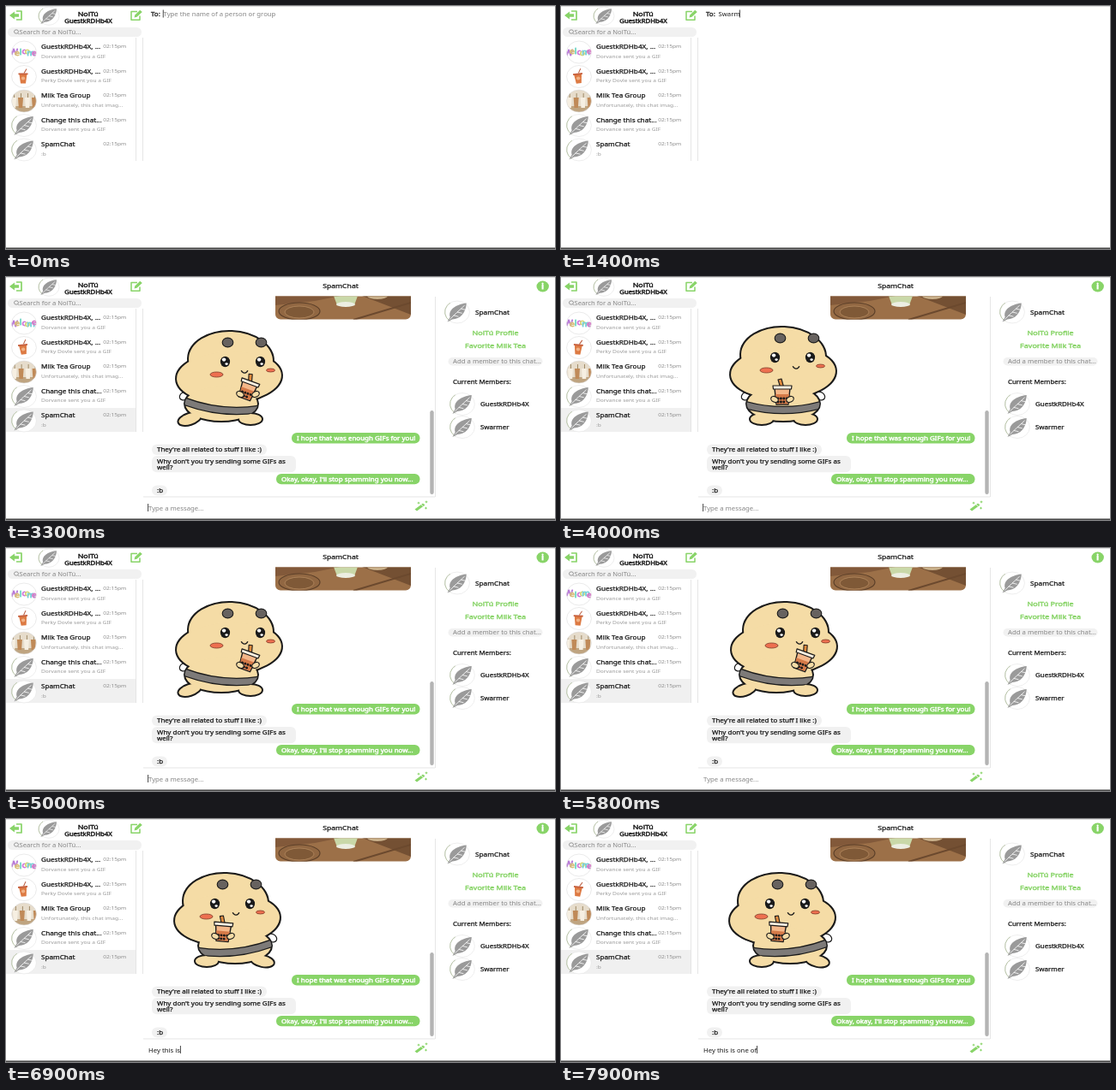
An HTML page with a canvas that plays this animation: 640 by 284 pixels, repeating every 8000 ms.

```html
<!DOCTYPE html>
<html lang="en">
<head>
<meta charset="utf-8">
<title>Chat</title>
<style>
  html, body { margin: 0; width: 100%; height: 100%; overflow: hidden; background: #fff; }
  canvas { display: block; width: 640px; height: 284px; }
</style>
</head>
<body>
<canvas id="stage"></canvas>
<script>
const W = 640, H = 284, LOOP = 8000;
const GREEN = '#88d468', INK = '#1a1a1a', GREY = '#858585', PALE = '#f1f1f1', LINE = '#e4e4e4';
const SKIN = '#f5dca6';
const ASPECT = 1.15; // the whole screen is a little wide
const MEDIUM = 0.25, SEMI = 0.42; // extra stroke that thickens the regular face
const APP = 'NolTú', ME = 'GuestkRDHb4X', PEER = 'Swarmer';
const PICK = 2200, OPEN = 3300;

const canvas = document.getElementById('stage');
const ctx = canvas.getContext('2d');
const dpr = window.devicePixelRatio || 1;
canvas.width = W * dpr;
canvas.height = H * dpr;

// Draws a line of text and returns its width on the stage.
function text(s, x, y, size = 6.74, heft = 0, color = INK, align = 'left') {
  ctx.save();
  ctx.translate(x, y);
  ctx.scale(ASPECT, 1);
  ctx.font = `${size}px "Noto Sans", "Open Sans", sans-serif`;
  ctx.fillStyle = ctx.strokeStyle = color;
  ctx.textAlign = align;
  ctx.fillText(s, 0, 0);
  if (heft) {
    ctx.lineWidth = heft;
    ctx.lineJoin = 'round';
    ctx.strokeText(s, 0, 0);
  }
  const w = ctx.measureText(s).width * ASPECT;
  ctx.restore();
  return w;
}

function rect(x, y, w, h, color) {
  ctx.fillStyle = color;
  ctx.fillRect(x, y, w, h);
}

function pill(x, y, w, h, r, color) {
  ctx.beginPath();
  ctx.roundRect(x, y, w, h, r);
  ctx.fillStyle = color;
  ctx.fill();
}

function paint(fill, stroke, width) {
  if (fill) { ctx.fillStyle = fill; ctx.fill(); }
  if (stroke) { ctx.strokeStyle = stroke; ctx.lineWidth = width; ctx.stroke(); }
}

function oval(x, y, rx, ry, fill, stroke, width = 1, turn = 0) {
  ctx.beginPath();
  ctx.ellipse(x, y, rx, ry, turn, 0, Math.PI * 2);
  paint(fill, stroke, width);
}

function poly(pts, fill, stroke, width = 1, closed = true) {
  ctx.beginPath();
  pts.forEach(([x, y]) => ctx.lineTo(x, y));
  if (closed) ctx.closePath();
  paint(fill, stroke, width);
}

// Upright glass shape: half widths at top and bottom.
function glass(x, top, bottom, a, b, fill, stroke, width) {
  poly([[x - a, top], [x + a, top], [x + b, bottom], [x - b, bottom]], fill, stroke, width);
}

/* ---------- avatars ---------- */

function leaf(x, y, rx = 14.4, ry = 13) {
  oval(x, y, rx, ry, '#fff', '#e2e2e2', 0.6);
  ctx.beginPath();
  ctx.ellipse(x, y, rx, ry, 0, 2.2, 4.1);
  paint(null, '#a9b894', 0.8);
  ctx.save();
  ctx.translate(x, y);
  ctx.scale(rx, ry);
  ctx.beginPath();
  ctx.moveTo(0.75, -0.8);
  ctx.bezierCurveTo(-0.1, -0.7, -0.75, -0.2, -0.58, 0.45);
  ctx.lineTo(-0.8, 0.88);
  ctx.lineTo(-0.4, 0.66);
  ctx.bezierCurveTo(0.25, 0.65, 0.7, 0.1, 0.75, -0.8);
  paint('#9a9a9a');
  ctx.beginPath();
  ctx.moveTo(-0.6, 0.65);
  ctx.quadraticCurveTo(-0.1, 0.1, 0.6, -0.6);
  for (let i = 0; i < 3; i++) {
    const k = 0.3 - i * 0.3;
    ctx.moveTo(k, -k);
    ctx.lineTo(k + 0.4, 0.1 - k);
  }
  paint(null, '#fff', 0.06);
  ctx.restore();
}

function framed(y, bg, draw, t) {
  ctx.save();
  oval(21, y, 14.4, 13, bg);
  ctx.clip();
  draw(y, t);
  ctx.restore();
  oval(21, y, 14.4, 13, null, '#dcdcdc', 0.6);
}

function letters(y, t) {
  [...'Welcome'].forEach((c, i) => {
    const color = `hsl(${280 + i * 125}, 55%, 66%)`;
    text(c, 9 + i * 4, y + 3 + Math.sin(t / 160 + i * 1.4), 9, 0.8, color, 'center');
  });
}

function drink(y, t) {
  ctx.save();
  ctx.translate(20, y + 1);
  ctx.rotate(Math.sin(t / 300) * 0.12);
  poly([[1, -5], [4, -10]], null, '#b9593b', 1, false);
  glass(0, -4, 7, 4.5, 3, '#dd7a43');
  rect(-5.5, -5, 11, 1.8, '#c65f3d');
  oval(0, 1, 2.2, 2, '#f0b184');
  ctx.restore();
}

function cups(y, t) {
  rect(4, y + 6, 36, 10, '#bfa480');
  for (let i = 0; i < 4; i++) {
    const x = 9 + i * 8 + Math.sin(t / 500) * 2;
    glass(x, y - 4, y + 8, 3, 2.2, i % 2 ? '#c08a58' : '#f6efe2');
    rect(x, y - 9, 1, 5, '#a08b68');
  }
}

/* ---------- sidebar ---------- */

function icons() {
  ctx.lineJoin = 'round';
  poly([[4, 11], [10, 6.5], [10, 9.3], [15, 9.3], [15, 12.7], [10, 12.7], [10, 15.5]], GREEN);
  poly([[12, 6], [18, 6], [18, 16], [12, 16]], null, GREEN, 1.7, false);
  poly([[153, 6.5], [146, 6.5], [146, 16.2], [156, 16.2], [156, 11.5]], null, GREEN, 1.5, false);
  poly([[149.5, 13.5], [150.3, 10.6], [156.2, 4.8], [158.8, 7], [152.6, 12.8]], GREEN);
}

function sidebar(t, open) {
  if (open) rect(0, 153, 152, 28, '#f0f0f0');
  icons();
  leaf(50, 11.7, 12, 10.6);
  text(APP, 95.7, 11.6, 7.65, SEMI, INK, 'center');
  text(ME, 96, 19.6, 6.75, SEMI, INK, 'center');

  pill(2, 25, 156, 11, 5.5, PALE);
  oval(12, 30, 2.5, 2.2, null, GREY, 0.8);
  poly([[13.8, 31.6], [15.4, 33.2]], null, GREY, 0.8, false);
  text(`Search for a ${APP}...`, 15.5, 33, 6.65, 0, GREY);

  rect(151, 37, 0.9, 144, LINE);
  rect(159, 37, 0.9, 144, LINE);

  const rows = [
    [ME + ', ...', 'Dorvance sent you a GIF'],
    [ME + ', ...', 'Perky Dovle sent you a GIF'],
    ['Milk Tea Group', 'Unfortunately, this chat imag...'],
    ['Change this chat...', 'Dorvance sent you a GIF'],
    ['SpamChat', ':b']
  ];
  rows.forEach(([name, note], i) => {
    const y = 28.5 * i;
    text(name, 41, 50 + y, 7.1, MEDIUM);
    text('02:15pm', 140.3, 49 + y, 5.75, 0, '#8c8c8c', 'right');
    text(note, 41, 60.5 + y, 5.72, 0, '#9a9a9a');
  });
  framed(54, '#fff', letters, t);
  framed(82.5, '#fff', drink, t);
  framed(111, '#e6dccb', cups, t);
  leaf(21, 139.5);
  leaf(21, 168);
}

/* ---------- new chat ---------- */

function caret(x, y) { rect(x, y, 0.9, 9, '#333'); }

function compose(t) {
  text('To:', 169, 11.7, 6.9, SEMI, '#333');
  if (t >= PICK) {
    pill(183, 5, 42.5, 11.6, 2.5, GREEN);
    text(PEER, 204.2, 13.4, 6.9, SEMI, '#fff', 'center');
    text('Press Enter in here to create a new chat or type to add more members', 183, 24.2, 6.76, 0, GREY);
    return;
  }
  const n = t < 600 ? 0 : Math.min(PEER.length, 1 + Math.floor((t - 600) / 170));
  if (!n) text('Type the name of a person or group', 183.5, 11.7, 6.72, 0, GREY);
  const w = n ? text(PEER.slice(0, n), 183.5, 11.7) : 0;
  if (n || t < 400) caret(182.8 + w, 4.5);
}

/* ---------- sticker ---------- */

function teaCup(x, y, turn) {
  ctx.save();
  ctx.translate(x, y);
  ctx.rotate(turn);
  poly([[-2, -7], [-5, -17], [-1, -18], [2, -7]], '#e08a3e', INK, 1.1);
  glass(0, -7, 12, 9, 7, '#f4b789', INK, 1.4);
  glass(0, 0, 11.3, 8, 6.4, '#d57a48');
  glass(0, -10, -6, 11, 10.5, '#fff3e2', INK, 1.2);
  for (let i = 0; i < 7; i++) oval(-5 + (i % 4) * 3.4, 5 + Math.floor(i / 4) * 4, 1.5, 1.4, INK);
  ctx.restore();
}

// Sways right, upright, left, upright in hard steps.
function leanAt(t) {
  const k = (t - 4000 + LOOP) % 800;
  return k >= 100 && k < 300 ? 1 : k >= 490 && k < 710 ? -1 : 0;
}

function sticker(t) {
  const lean = leanAt(t), tilt = Math.abs(lean);
  const right = Math.max(lean, 0), left = Math.max(-lean, 0);
  const hx = 259 + 3 * lean, hy = 92 + 5 * tilt; // head
  const fx = 270 + 6 * lean, fy = 94 + 5 * tilt; // face
  const bx = 259 - 8 * lean;                     // body

  for (const side of [-1, 1]) {
    if (side !== lean) oval(bx + side * 43, 139, 6, 4.5, '#fff', INK, 1.2, side * 0.5);
  }

  // Overlapping ovals: outlines first, then fills, so only the joint edge stays.
  const parts = [
    [hx, hy, 49, 33, 0.04],
    [hx - 2 * lean, hy + 20, 61, 30, -0.04],
    [bx, 148, 42, 20, 0],
    [234 - 20 * right, 166, 13, 6, -0.3 * right],
    [285 + 14 * left, 166, 13, 6, 0.2 * left]
  ];
  for (const p of parts) oval(...p.slice(0, 4), null, INK, 4, p[4]);
  for (const p of parts) oval(...p.slice(0, 4), SKIN, null, 0, p[4]);

  ctx.save();
  oval(bx, 148, 42.5, 20);
  ctx.clip();
  for (const [color, w] of [[INK, 9.5], ['#7d7a78', 7]]) {
    ctx.beginPath();
    ctx.moveTo(bx - 46, 149 - 5 * lean);
    ctx.quadraticCurveTo(bx, 162, bx + 46, 149 + 5 * lean);
    paint(null, color, w);
  }
  ctx.restore();

  for (const side of [-1, 1]) {
    const ex = fx + side * 20.5, cheek = side < 0 ? 7.5 : 5;
    oval(hx + 16 + side * 19.5, hy - 20.5, 6.3, 5.4, '#67625f', INK, 1.1);
    oval(fx + 1 + side * 31.5, fy + 12.5 - side * 2.5, cheek, cheek * 0.4, '#ee7050', '#7d3a28', 0.8);
    oval(ex, fy, 5.6, 6.2, INK);
    oval(ex - 1.4, fy - 2.4, 2.2, 2.1, '#fff');
    oval(ex + 1.6, fy + 2.6, 1.7, 1.4, '#fff');
  }
  ctx.beginPath();
  ctx.arc(fx + 4 - 2 * right, fy + 9, 4, 0.3, 2.8);
  paint(null, INK, 1.4);

  const cx = 258 + 24 * right - 5 * left, cy = 137 - 6 * tilt;
  teaCup(cx, cy, 0.35 * right + 0.08 * left);
  for (const side of [-1, 1]) oval(cx + side * 9, cy + 6, 4.5, 3.2, SKIN, INK, 1.2, -side * 0.5);
}

/* ---------- chat ---------- */

function photo() {
  ctx.save();
  ctx.beginPath();
  ctx.roundRect(314, 22.5, 158, 27, [0, 0, 6, 6]);
  ctx.clip();
  rect(314, 22, 158, 28, '#9c7048');
  poly([[314, 22], [390, 22], [360, 28], [314, 33]], '#82593a');
  poly([[415, 22], [472, 22], [472, 44]], '#745033');
  poly([[405, 50], [472, 30]], null, '#6b492e', 2, false);
  oval(342, 40, 24, 10, '#916742', '#5d4029', 1.2);
  oval(342, 41, 17, 7, '#7f5937', '#b58b60', 0.8);
  glass(396, 22, 33, 14, 10, '#c9d8a8');
  oval(396, 32, 11, 3, '#eceee2');
  oval(433, 22, 12, 4, '#c9b08a');
  ctx.restore();
}

function bubble(x, y, w, h, mine, lines) {
  pill(x, y, w, h, 6, mine ? GREEN : PALE);
  lines.forEach((s, i) =>
    text(s, x + 6, y + 8.7 + i * 7.4, 6.95, mine ? SEMI : MEDIUM, mine ? '#fff' : INK));
}

function input(t) {
  const msg = 'Hey this is one of', y = 272.6;
  const n = t < 6000 ? 0
    : t < 6900 ? Math.min(11, 1 + Math.floor((t - 6000) / 85))
    : Math.min(msg.length, 11 + Math.floor((t - 6900) / 140));
  if (n) {
    caret(166 + text(msg.slice(0, n), 166, y), 265);
  } else {
    text('Type a message...', 166, y, 6.74, 0, GREY);
    if ((t - 3900 + 1060) % 1060 < 530) caret(165.2, 265);
  }
}

function wand() {
  poly([[476.5, 271.5], [486, 264.5], [488.5, 266.5], [479, 273.5]], GREEN);
  poly([[484, 266], [486.3, 268]], null, '#fff', 0.8, false);
  for (const [x, y] of [[481, 264], [490, 262.8], [489.5, 270]]) {
    oval(x, y, 1.7, 0.6, GREEN);
    oval(x, y, 0.6, 1.6, GREEN);
  }
}

function chat(t) {
  text('SpamChat', 390, 13.2, 7.5, MEDIUM, INK, 'center');
  photo();
  sticker(t);
  bubble(333, 182, 149.5, 12.4, true, ['I hope that was enough GIFs for you!']);
  bubble(170, 195.5, 134, 12.4, false, ["They're all related to stuff I like :)"]);
  bubble(170, 209, 168, 19.2, false, ["Why don't you try sending some GIFs as", 'well?']);
  bubble(315, 230, 167.5, 12.2, true, ["Okay, okay, I'll stop spamming you now..."]);
  bubble(170, 243.5, 18, 12, false, [':b']);
  pill(494.3, 156, 4.4, 98, 2.2, '#b4b4b4');
  rect(500, 23, 0.9, 234, LINE);
  rect(160, 256.5, 340, 0.9, LINE);
  input(t);
  wand();
}

function details() {
  oval(625.7, 11, 7.2, 6.4, GREEN);
  text('i', 625.7, 14.2, 9, 1, '#fff', 'center');
  leaf(526, 41);
  text('SpamChat', 547, 43.6, 7.2, MEDIUM);
  text(`${APP} Profile`, 570.6, 67.6, 7.8, SEMI, GREEN, 'center');
  text('Favorite Milk Tea', 570.6, 82.8, 7.85, SEMI, GREEN, 'center');
  pill(515.5, 94, 110, 9.4, 4.7, PALE);
  text('Add a member to this chat...', 521, 101.2, 6.75, 0, GREY);
  text('Current Members:', 521, 125.2, 6.87, MEDIUM);
  [ME, PEER].forEach((name, i) => {
    leaf(532, 148.5 + i * 27);
    text(name, 553, 151.2 + i * 27, 6.9, MEDIUM);
  });
}

function draw(t) {
  const open = t >= OPEN;
  ctx.setTransform(dpr, 0, 0, dpr, 0, 0);
  rect(0, 0, W, H, '#fff');
  sidebar(t, open);
  if (open) {
    chat(t);
    details();
  } else {
    compose(t);
  }
  rect(0, 0, W, 0.7, '#cfcfcf');
  rect(0, 282.4, W, 1.6, '#4a4a4a');
}

const start = performance.now();
function tick(now) {
  draw(Math.max(0, now - start) % LOOP);
  requestAnimationFrame(tick);
}
draw(0);
requestAnimationFrame(tick);
</script>
</body>
</html>
```
